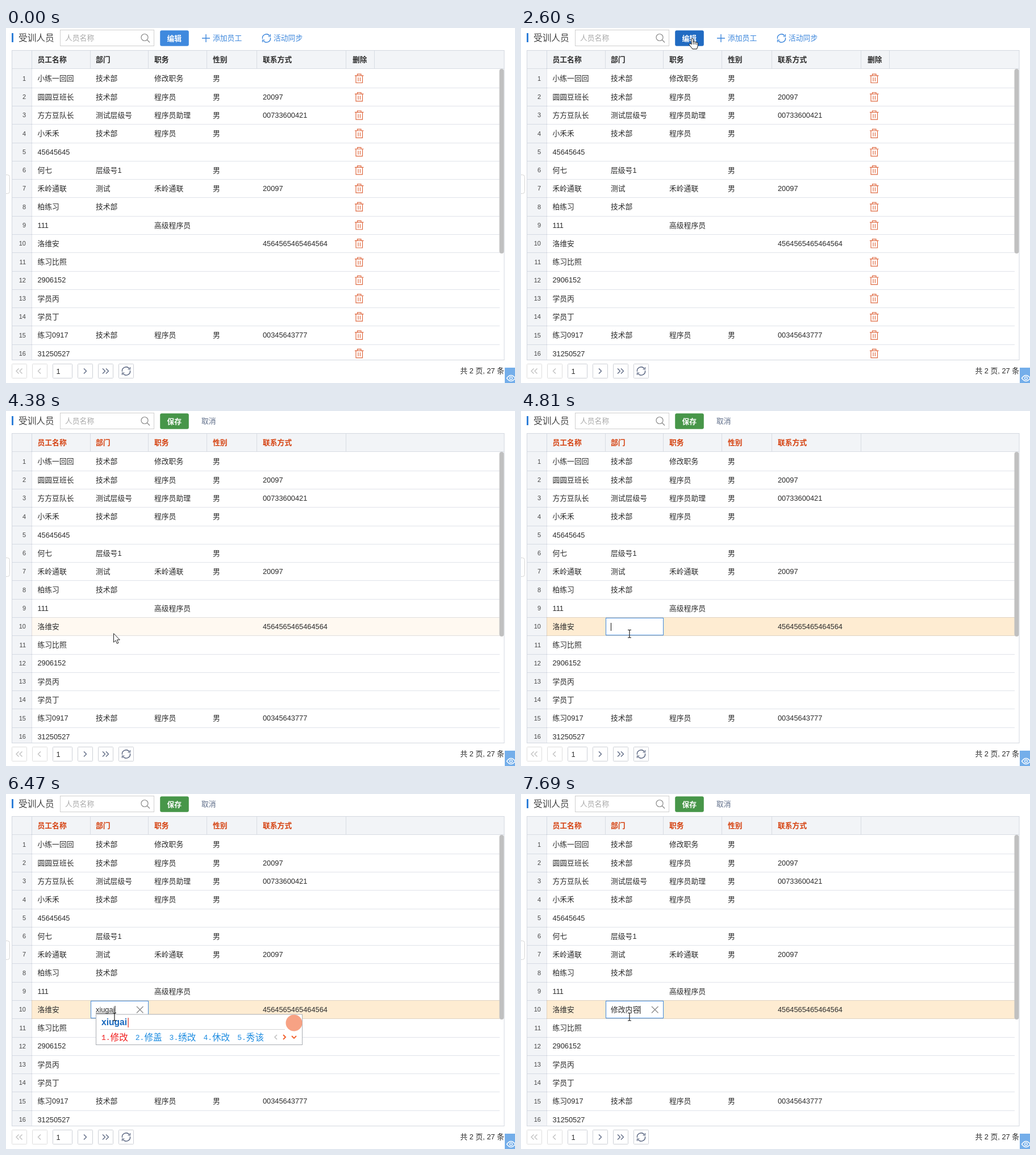
Animation, 896 px wide and 625 px high, one loop 8 s. Source, as an HTML page:

```html
<!DOCTYPE html>
<html lang="zh-CN">
<head>
<meta charset="utf-8">
<title>受训人员</title>
<style>
html, body { margin: 0; width: 100%; height: 100%; overflow: hidden; background: #fff; }
svg { display: block; width: 896px; height: 625px; }
text { font: 12.8px "Liberation Sans", "Noto Sans CJK SC", "Noto Sans CJK", sans-serif; fill: #2b2b2b; white-space: pre; }
.bold { font-weight: 700; }
.num { font-size: 11px; text-anchor: end; fill: #444; }
.title { font-size: 15.7px; fill: #444; }
.blue { fill: #3d87dc; }
.grey { fill: #a9a9a9; }
.ime { font-size: 15.6px; }
.mono { font: 13px "Liberation Mono", monospace; }
</style>
</head>
<body>
<svg id="stage" viewBox="0 0 896 625">
  <defs><clipPath id="body"><rect x="10" y="72" width="868" height="512"/></clipPath></defs>
  <rect width="896" height="625" fill="#fff"/>
  <g id="rowFill"></g>
  <g id="grid"></g>
  <g id="mode"></g>
  <g id="editor"></g>
  <g id="pointer"></g>
</svg>
<script>
const LOOP = 8000, ROW = 32.28, COLS = [55.5, 158, 261, 364, 452];
const RULE = 'rgba(40,60,110,.14)';
const rows = [
  ['小练一回回', '技术部', '修改职务', '男'],
  ['圆圆豆班长', '技术部', '程序员', '男', '20097'],
  ['方方豆队长', '测试层级号', '程序员助理', '男', '00733600421'],
  ['小禾禾', '技术部', '程序员', '男'],
  ['45645645'],
  ['何七', '层级号1', '', '男'],
  ['禾岭通联', '测试', '禾岭通联', '男', '20097'],
  ['柏练习', '技术部'],
  ['111', '', '高级程序员'],
  ['洛维安', '', '', '', '4564565465464564'],
  ['练习比照'],
  ['2906152'],
  ['学员丙'],
  ['学员丁'],
  ['练习0917', '技术部', '程序员', '男', '00345643777'],
  ['31250527']
];

// time, shape, x, y, hovered row
const pointerSteps = [
  [0, ''],
  [860, 'arrow', 610, 606], [980, 'arrow', 480, 450], [1110, 'arrow', 330, 346], [1230, 'arrow', 246, 432],
  [1380, 'arrow', 258, 300, 8], [1500, 'arrow', 280, 160, 3], [1620, 'arrow', 297.5, 55.5, 1],
  [1770, 'hand', 297, 29], [1910, 'hand', 296, 22], [2040, 'hand', 295, 18],
  [3280, 'arrow', 286, 48], [3400, 'arrow', 277, 110, 1], [3540, 'arrow', 268, 256, 6],
  [3690, 'arrow', 243, 297, 7], [3810, 'arrow', 224, 328, 8], [3930, 'arrow', 211, 349, 9],
  [4070, 'arrow', 198, 366, 10], [4230, 'arrow', 198, 366.5, 10], [4380, 'arrow', 189, 391, 10],
  [4810, 'beam', 191, 392]
];

// time, committed text, caret, composing text, candidates, right edge of the panel
const editSteps = [
  [4810, '', true], [5240, '', false], [5800, '', true],
  [6200, '', true, 'x', '下 想 向 小 些', 444],
  [6350, '', true, 'xiu', '修 秀 休 袖 羞', 444],
  [6470, '', true, 'xiugai', '修改 修盖 绣改 休改 秀该', 522],
  [6750, '修改', true],
  [7030, '修改', true, 'ne', '呢 呐 那 哪 讷', 469],
  [7150, '修改', true, 'nei', '内 那 馁 氖 内部', 485],
  [7290, '修改', true, 'neiron', '内容 内燃机 内人 内绕组件 内润滑剂', 621],
  [7540, '修改', true, 'neirong', '内容 内容管理 内容简介 内容丰富 内容页', 652],
  [7690, '修改内容', true]
];

const ctx = document.createElement('canvas').getContext('2d');
const measure = (s, font) => {
  ctx.font = font + ' "Liberation Sans", "Noto Sans CJK SC", "Noto Sans CJK", sans-serif';
  return ctx.measureText(s).width;
};
const text = (x, y, s, cls = '', extra = '') => `<text x="${x}" y="${y}" class="${cls}" ${extra}>${s}</text>`;
const rect = (x, y, w, h, fill, extra = '') =>
  `<rect x="${x}" y="${y}" width="${w}" height="${h}" fill="${fill}" ${extra}/>`;
const box = (x, y, w, h, stroke, r = 0) => rect(x + .5, y + .5, w - 1, h - 1, '#fff', `stroke="${stroke}" rx="${r}"`);
const line = (d, stroke, w = 1, extra = '') =>
  `<path d="${d}" fill="none" stroke="${stroke}" stroke-width="${w}" ${extra}/>`;
const rowTop = n => Math.round(72.45 + ROW * (n - 1));
const rowMid = n => 88.9 + ROW * (n - 1);
const stepAt = (steps, t) => steps.filter(s => s[0] <= t).pop();

const layers = {};
function put(id, markup) {
  if (layers[id] === markup) return;
  layers[id] = markup;
  document.getElementById(id).innerHTML = markup;
}

function sync(x, y, r, color) {
  return line(`M${x - r} ${y + 1}A${r} ${r} 0 0 1 ${x + r * .8} ${y - r * .6}M${x + r} ${y - 1}A${r} ${r} 0 0 1 ${x - r * .8} ${y + r * .6}`, color, 1.4) +
    line(`M${x + r} ${y - r}v4h-4M${x - r} ${y + r}v-4h4`, color, 1.2);
}

function trash(y) {
  return line(`M614 ${y - 5}h15.5M618.5 ${y - 5}v-2.7h6.5v2.7M616 ${y - 5}v12.6h11.5v-12.6M620 ${y - 2}v7M623.5 ${y - 2}v7`, '#df6a42', 1.2);
}

function drawGrid() {
  let s = rect(10, 9, 3, 16, '#2f7fd8') + text(22, 23, '受训人员', 'title');
  s += box(95, 3, 166, 29, '#cfcfcf') + text(104, 22.4, '人员名称', 'grey');
  s += `<circle cx="244" cy="16.5" r="6" fill="none" stroke="#888" stroke-width="1.2"/>` + line('M248.5 21l4.5 4.5', '#888', 1.3);

  s += rect(11, 40, 866, 32, '#f2f4f7') + rect(11, 72, 34, 512, '#f2f4f7');
  for (let n = 1; n <= 15; n++) s += rect(11, rowTop(n + 1), 858, 1, RULE);
  s += rect(11, 71, 866, 1, '#d8dce3') + rect(45, 40, 1, 544, RULE);
  for (const x of [148, 250, 353, 441, 598]) s += rect(x, 40, 1, 32, '#d8dce3');
  s += '<g clip-path="url(#body)">';
  rows.forEach((row, i) => {
    const y = rowMid(i + 1) + 4.5;
    s += text(35, y - .6, i + 1, 'num');
    row.forEach((v, c) => { if (v) s += text(COLS[c], y, v); });
  });
  s += '</g>' + rect(10.5, 39.5, 866.5, 545, 'none', 'stroke="#d3d8e0"');
  s += rect(868.5, 72, 8, 325, '#c0c0c0', 'rx="4"');

  for (const x of [10, 46, 82, 126, 162, 198]) s += box(x, 591, x === 82 ? 35 : 27, 26, x < 80 ? '#dedede' : '#cdd0d6', 1);
  const left = x => `M${x} 599.5l-4.5 4.5 4.5 4.5`, right = x => `M${x} 599.5l4.5 4.5-4.5 4.5`;
  s += line(left(22.5) + left(28.5) + left(61), '#bbb', 1.2);
  s += line(right(137) + right(170) + right(176), '#596580', 1.3);
  s += text(88.5, 608.6, '1') + sync(211.5, 604, 7, '#596580');
  s += text(877, 608.4, '共 2 页, 27 条', '', 'text-anchor="end"');

  s += rect(-4.5, 258.5, 11, 33, '#fff', 'stroke="#d5d5d5" rx="4"');
  s += rect(878, 598, 18, 27, '#74aeea') +
    '<path d="M881.5 616.5q7.5-10 15 0q-7.5 10-15 0Z" fill="none" stroke="#fff" stroke-width="1.3"/>' +
    '<circle cx="889" cy="616.5" r="2.4" fill="none" stroke="#fff" stroke-width="1.2"/>';
  put('grid', s);
}

function drawMode(t) {
  const editing = t >= 2750;
  const color = editing ? '#479649' : t >= 2600 ? '#216bc2' : t >= 1770 ? '#327bd0' : '#3f89de';
  let s = rect(271.2, 4.2, 50.6, 27.6, color, 'rx="3"') +
    text(296.3, 22.5, editing ? '保存' : '编辑', 'bold', 'text-anchor="middle" style="fill:#fff"');
  ['员工名称', '部门', '职务', '性别', '联系方式'].forEach((h, i) => {
    s += text(COLS[i], 60.4, h, 'bold', editing ? 'style="fill:#d5410f"' : '');
  });
  if (editing) {
    s += text(344, 22.4, '取消', '', 'style="fill:#5d6c88"');
  } else {
    s += line('M345 18h14M352 11v14', '#3d87dc', 1.4) + text(364, 22.4, '添加员工', 'blue');
    s += sync(458.5, 18, 7, '#3d87dc') + text(471, 22.4, '活动同步', 'blue');
    s += rect(648, 40, 1, 32, '#d8dce3') + text(610, 60.4, '删除', 'bold');
    s += '<g clip-path="url(#body)">' + rows.map((_, i) => trash(rowMid(i + 1))).join('') + '</g>';
  }
  put('mode', s);
}

function imePanel(x, typed, words, edge) {
  const caret = x + 11.5 + measure(typed, 'bold 15.6px');
  let s = rect(x + .5, 388, edge - x - 1, 53.5, '#fff', 'stroke="#a9adb3"');
  s += text(x + 10, 406.6, typed, 'ime bold', 'style="fill:#1767bd"') + rect(caret, 394, 1.2, 17, '#e03020');
  s += rect(x + 8, 414, edge - x - 39, 1, '#d5d5d5');
  let wx = x + 10;
  words.split(' ').forEach((w, i) => {
    const fill = `style="fill:${i ? '#1b8be0' : '#f01c1c'}"`;
    s += text(wx, 433, `${i + 1}.`, 'mono', fill) + text(wx + 15.6, 433.6, w, 'ime', fill);
    wx += 28.6 + 15.6 * w.length;
  });
  s += line(`M${edge - 45} 424l-4 4 4 4`, '#bbb', 1.4);
  s += line(`M${edge - 34} 424l4 4-4 4M${edge - 19} 426l4 4 4-4`, '#f2602c', 1.9);
  return s + `<circle cx="${edge - 15}" cy="403" r="14.5" fill="#f7a284"/>`;
}

function drawEditor(t) {
  const step = stepAt(editSteps, t);
  if (!step) return put('editor', '');
  const [, done, caretOn, typed = '', words, edge] = step;
  const start = 158 + measure(done, '12.8px'), end = start + measure(typed, '12.8px');
  let s = box(149, 364, 102, 31, '#3f8ade');
  s += text(158, rowMid(10) + 4.5, done + typed);
  if (typed) s += rect(start, 385.5, end - start, 1, '#333');
  if (caretOn) s += rect(end, 373, 1, 14, '#111');
  if (done || typed) s += line('M230 374l11.5 11.5M241.5 374l-11.5 11.5', '#8d8d8d', 1.4);
  if (typed) s += imePanel(start, typed, words, edge);
  put('editor', s);
}

const shapes = {
  arrow: '<path d="M.5 .7V16.2L4 12.9 6.4 18.4 8.9 17.3 6.5 11.9H11.3Z" fill="#fff" stroke="#222"/>',
  hand: '<path d="M5 11V2a1.6 1.6 0 0 1 3.2 0V7a1.5 1.5 0 0 1 3 .4a1.4 1.4 0 0 1 2.7.6a1.3 1.3 0 0 1 2.4.8V13.5L14.5 19H7L1.3 11.8a1.5 1.5 0 0 1 2.2-2Z" fill="#fff" stroke="#111"/>' +
    line('M8.2 7v4M11.2 8v3M13.9 8.5v3', '#111', .9),
  beam: line('M-3 -6.5h2.2l.8.8.8-.8h2.2M0 -6V6.5M-3 7h2.2l.8-.8.8.8h2.2', '#111', 1.1)
};

function drawPointer(t) {
  const [, shape, x, y, hover] = stepAt(pointerSteps, t);
  put('pointer', shape ? `<g transform="translate(${x} ${y})">${shapes[shape]}</g>` : '');
  const n = t >= 4810 ? 10 : hover;
  put('rowFill', n ? rect(45, rowTop(n), 824, rowTop(n + 1) - rowTop(n) + 1, t >= 4810 ? '#feecd2' : '#fff9f1') : '');
}

function render(t) {
  drawMode(t);
  drawEditor(t);
  drawPointer(t);
}

drawGrid();
const began = performance.now();
function tick() {
  render((performance.now() - began) % LOOP);
  requestAnimationFrame(tick);
}
tick();
</script>
</body>
</html>
```
